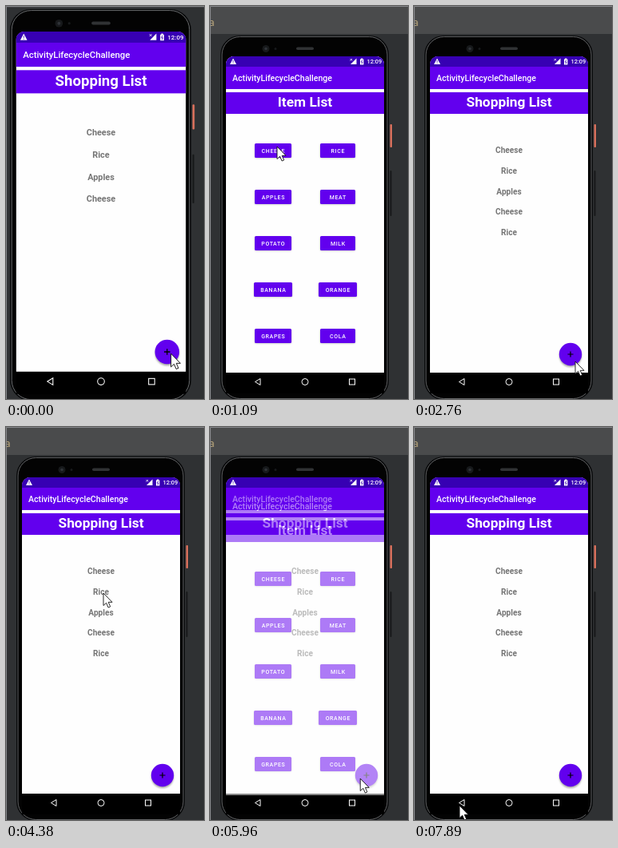
Animation, 248 px wide and 492 px high, one loop 8000 ms. Source, as an HTML page:

```html
<!DOCTYPE html>
<html lang="en">
<head>
<meta charset="utf-8">
<title>Shopping list demo</title>
<style>
  html, body { margin: 0; width: 100%; height: 100%; overflow: hidden; background: #2f3133; }
  svg { display: block; width: 248px; height: 492px; font-family: Roboto, sans-serif; }
  .mid { text-anchor: middle; }
  .bar { font-size: 10.6px; font-weight: 500; fill: #fff; }
  .head { font-size: 17.35px; font-weight: 700; fill: #fff; }
  .item { font-size: 10.1px; font-weight: 700; fill: #757575; }
  .label { font-size: 7px; font-weight: 500; letter-spacing: .63px; fill: #fff; }
</style>
</head>
<body>
<svg viewBox="0 0 248 492">
  <defs>
    <clipPath id="screen"><rect x="20" y="63" width="198" height="430" rx="10"/></clipPath>
    <filter id="soft" x="-30%" y="-30%" width="160%" height="180%"><feGaussianBlur stdDeviation="1.2"/></filter>
  </defs>
  <g id="camera">
    <rect x="-20" y="-20" width="300" height="540" fill="#2f3133"/>
    <rect x="-20" y="-60" width="300" height="95" fill="#4a4b4c"/>
    <text x="-1.5" y="24.5" font-size="13" fill="#b9a67c">a</text>

    <rect x="225.5" y="148" width="2.5" height="29" rx="1" fill="#d9705c"/>
    <rect x="225.5" y="206" width="2" height="57" rx="1" fill="#18191a"/>
    <rect x="13" y="37" width="211" height="456" rx="24" fill="#08090a"/>
    <rect x="15" y="38.5" width="207" height="453" rx="22.500" fill="#030303" stroke="#6c6e70" stroke-width=".9"/>
    <circle cx="70" cy="53.5" r="4.500" fill="#17191b"/>
    <circle cx="70" cy="53.5" r="1.800" fill="#2f3338"/>
    <circle cx="82" cy="53.5" r="1.500" fill="#17191b"/>
    <rect x="108" y="51.5" width="22" height="3.600" rx="1.800" fill="#303234"/>

    <g clip-path="url(#screen)">
      <g id="list"></g>
      <g id="shop"></g>
      <rect x="20" y="60" width="198" height="16" fill="#3700b3"/>
      <rect x="20" y="461" width="198" height="24"/>
      <g fill="#fff">
        <path d="M29 65.500l4 7.500h-8z"/>
        <path d="M183.500 65.500v7.500h-7.500z"/>
        <path d="M188 66.500h1.200v-1h2v1h1.200v7h-4.400z"/>
        <text x="196.500" y="72.300" font-size="7.400" font-weight="500">12:09</text>
      </g>
      <g fill="none" stroke="#3700b3" stroke-width=".8">
        <path d="M29 68v2.400m0 .8v.9"/>
        <path d="M190.700 67.500l-1.300 2.700h1.600l-1 2.300"/>
        <path d="M175.500 66l2.600 2.600m0-2.600l-2.600 2.600" stroke="#fff"/>
      </g>
    </g>

    <g fill="none" stroke="#fff">
      <path d="M63 466.500v8l-6.500-4z"/>
      <circle cx="119" cy="470.500" r="4"/>
      <rect x="174.500" y="467" width="7" height="7"/>
    </g>
    <path id="cursor" d="M0 0v15.500l3.600-3.300 2.500 5.800 2.600-1.100-2.500-5.600h4.800z"
      fill="#fff" stroke="#111" stroke-width=".9" stroke-linejoin="round"/>
  </g>
  <path d="M.5 492V.5H248" fill="none" stroke="#85878a"/>
</svg>
<script>
const $ = id => document.getElementById(id);
const LOOP = 8000;
const PURPLE = '#6200ee';

const page = title => `
  <rect x="20" y="50" width="198" height="409" fill="#fefefe"/>
  <rect x="20" y="50" width="198" height="54" fill="${PURPLE}"/>
  <rect x="20" y="108" width="198" height="27" fill="${PURPLE}"/>
  <text class="bar" x="28" y="94">ActivityLifecycleChallenge</text>
  <text class="head mid" x="119" y="126.200">${title}</text>`;

const row = (name, i) =>
  `<text class="item mid" id="row${i}" x="119" y="${184.2 + 25.75 * i}">${name}</text>`;

const button = (name, i) => `
  <g transform="translate(${i % 2 ? 160 : 79} ${181 + 58 * (i >> 1)})">
    <rect y="-8" height="17.500" rx="2" opacity=".25" filter="url(#soft)"/>
    <rect y="-9" height="18" rx="1.500" id="${name}" fill="${PURPLE}"/>
    <text class="label mid" x=".3" y="2.500">${name.toUpperCase()}</text>
  </g>`;

$('list').innerHTML = page('Shopping List') +
  ['Cheese', 'Rice', 'Apples', 'Cheese', 'Rice'].map(row).join('') +
  `<circle cx="196" cy="438" r="14" opacity=".35" filter="url(#soft)"/>
   <circle id="add" cx="196" cy="436" r="14.200"/>
   <path d="M192.500 436h7m-3.500-3.500v7" stroke="#000" stroke-width="1.200"/>`;

$('shop').innerHTML = page('Item List') +
  ['Cheese', 'Rice', 'Apples', 'Meat', 'Potato', 'Milk', 'Banana', 'Orange', 'Grapes', 'Cola']
    .map(button).join('');

// Buttons wrap their label, down to a minimum width
for (const label of document.querySelectorAll('.label')) {
  const w = Math.max(44, Math.round(label.getComputedTextLength() / 2) * 2 + 16);
  for (const box of label.parentNode.querySelectorAll('rect')) {
    box.setAttribute('x', -w / 2);
    box.setAttribute('width', w);
  }
}

// Pointer moves: start, end, x, y
const home = [200.5, 438];
const moves = [
  [130, 404, 196, 414],
  [404, 1090, 84, 176],
  [1230, 1470, 152, 184.5],
  [2100, 2700, 202, 445],
  [3300, 4130, 122, 208],
  [4380, 5300, 197, 437],
  [5800, 6830, 62, 484],
  [6850, 7130, 59, 469],
  [7400, 7890, 57, 474],
];

const ramp = (t, a, b) => {
  const x = Math.min(1, Math.max(0, (t - a) / (b - a)));
  return x * x * (3 - 2 * x);
};
const within = (t, a, b) => t >= a && t < b;
const set = (id, name, value) => $(id).setAttribute(name, value);

function pointerAt(t) {
  return moves.reduce(([px, py], [a, b, x, y]) => {
    const k = ramp(t, a, b);
    return [px + (x - px) * k, py + (y - py) * k];
  }, home);
}

function draw(t) {
  const zoom = 1 + (1 / .93 - 1) * (1 - ramp(t, 130, 404));
  const shown = ramp(t, 130, 475) - ramp(t, 2150, 2470) + ramp(t, 5800, 6150) - ramp(t, 7250, 7560);
  const pressed = within(t, 130, 400) || within(t, 5580, 5900);
  set('camera', 'transform', `translate(119 475.7) scale(${zoom}) translate(-119 -475.7)`);
  set('shop', 'transform', `translate(0 ${16 * (1 - shown)})`);
  set('shop', 'opacity', Math.min(1, shown * 1.2));
  set('row4', 'opacity', t > 1000 ? 1 : 0);
  set('Rice', 'fill', within(t, 1890, 2170) ? '#8743f0' : PURPLE);
  set('add', 'fill', pressed ? '#4a00b8' : PURPLE);
  set('cursor', 'transform', `translate(${pointerAt(t)})`);
}

let start;
function frame(now) {
  start ??= now;
  draw((now - start) % LOOP);
  requestAnimationFrame(frame);
}
requestAnimationFrame(frame);
</script>
</body>
</html>
```
